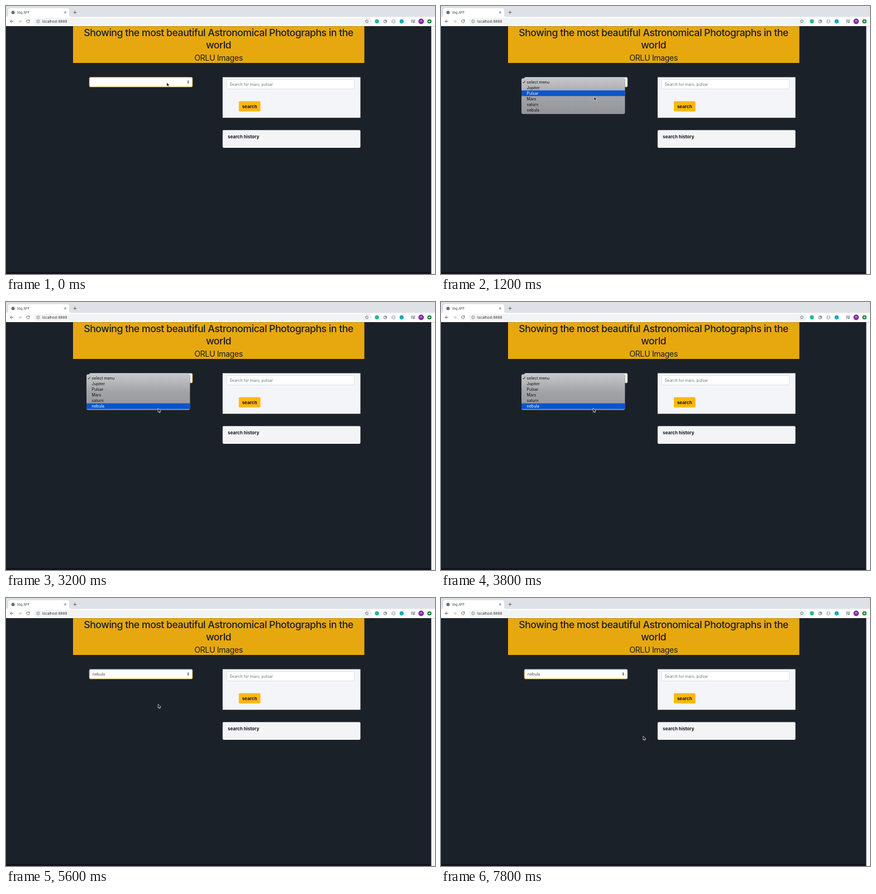
Recreate the animation shown at these times as an HTML page. Size 768 by 480 pixels, loop 8000 ms.

```html
<!DOCTYPE html>
<html lang="en">
<head>
<meta charset="utf-8">
<title>Img APP</title>
<style>
  html, body { margin: 0; width: 100%; height: 100%; overflow: hidden; background: #1b2129; }
  svg { display: block; width: 768px; height: 480px; }
  text { font: 7.05px Inter, sans-serif; fill: #111; white-space: pre; }
  .heading { font-size: 17.7px; font-weight: 500; letter-spacing: -.5px; text-anchor: middle; fill: #1c2028; }
  .subheading { font-size: 14.2px; letter-spacing: -.42px; text-anchor: middle; fill: #1c2028; }
  .bold { font-size: 8px; font-weight: 700; fill: #15191f; }
  .muted { fill: #6c757d; }
  .line { fill: none; stroke: #5f6368; stroke-width: 1; }
</style>
</head>
<body>
<svg viewBox="0 0 768 480">
  <defs>
    <linearGradient id="menuFill" x2="0" y2="1">
      <stop offset="0" stop-color="#c6c7c9"/>
      <stop offset=".5" stop-color="#a1a3a7"/>
      <stop offset="1" stop-color="#92959b"/>
    </linearGradient>
  </defs>

  <!-- Browser chrome -->
  <rect width="768" height="20" fill="#dee1e6"/>
  <path d="M0 20q4 0 4-4V8q0-4 4-4H109q4 0 4 4v8q0 4 4 4z" fill="#fff"/>
  <rect y="19.5" width="768" height="16.7" fill="#fff"/>
  <circle cx="12.7" cy="11.5" r="2.9" fill="#4d5156"/>
  <path d="M10.7 10.2l2 .6-.5 1.5M13.5 9.2l.6 1.4 1 .2M13 13.4l1.2-1" class="line" style="stroke:#ddd;stroke-width:.6"/>
  <text x="20" y="13.5" style="font-size:5.5px;fill:#3c4043">Img APP</text>
  <path d="M104.3 9.8l3.4 3.4m0-3.4l-3.4 3.4M120.6 11.5h5.8m-2.9-2.9v5.8" class="line"/>
  <path d="M13 27.5H7.5m2.6-2.6l-2.6 2.6 2.6 2.6" class="line"/>
  <path d="M22 27.5h5.5m-2.6-2.6l2.6 2.6-2.6 2.6" class="line" style="stroke:#babcbe"/>
  <path d="M41.5 25.6a2.7 2.7 0 1 0 .6 2.6M42.2 24.4v2.3h-2.3" class="line"/>
  <rect x="50" y="21.4" width="605" height="12.3" rx="6.1" fill="#f1f3f4"/>
  <circle cx="57.5" cy="27.5" r="2.6" class="line" style="stroke-width:.7"/>
  <path d="M57.5 27.2v1.7m0-3v.7" class="line" style="stroke-width:.7"/>
  <text x="65" y="29.8" style="font-size:6.3px;fill:#303338">localhost:8888</text>
  <path d="M646 24.4l.9 2 2.2.2-1.7 1.5.5 2.2-1.9-1.2-1.9 1.2.5-2.2-1.7-1.5 2.2-.2z" class="line" style="stroke-width:.7"/>
  <circle cx="664" cy="27.5" r="3.7" fill="#25b89a"/>
  <circle cx="679" cy="27.5" r="2.7" class="line"/>
  <circle cx="679.8" cy="26.8" r="1.1" fill="#5f6368"/>
  <circle cx="693.6" cy="27.5" r="3.1" class="line" style="stroke:#85888c;stroke-width:.8"/>
  <path d="M692.8 26.2l-1 1.3 1 1.3m1.6-2.6l1 1.3-1 1.3" class="line" style="stroke-width:.6"/>
  <circle cx="708.3" cy="27.5" r="3.7" fill="#1ba6bd"/>
  <path d="M725.3 25.2h4.6m-4.6 2h4.6m-4.6 2h2.7M731 29.3v-4.4h1.5" class="line" style="stroke-width:.9"/>
  <circle cx="729.9" cy="29.3" r="1.1" fill="#5f6368"/>
  <circle cx="743.2" cy="27.5" r="4.9" fill="#8428a5"/>
  <text x="743.2" y="29.4" text-anchor="middle" style="font-size:5.2px;fill:#fff">H</text>
  <circle cx="758" cy="27.5" r="3.8" fill="#188038"/>
  <path d="M756.1 27.5h3.8m-1.9-1.9v3.8" class="line" style="stroke:#fff"/>

  <!-- Page -->
  <rect y="36.2" width="768" height="443.8" fill="#1b2129"/>
  <rect y="476.5" width="762" height="3.5" fill="#11151b"/>
  <rect x="761.3" y="36.2" width="6.7" height="443.8" fill="#f8f8f9"/>
  <rect x="120" y="36.2" width="521.5" height="65.8" fill="#e7a80f"/>
  <text class="heading" x="380.5" y="54.2">Showing the most beautiful Astronomical Photographs in the</text>
  <text class="heading" x="380.5" y="76.2">world</text>
  <text class="subheading" x="380.5" y="97.9">ORLU Images</text>

  <rect x="387.8" y="127.5" width="246.7" height="72.7" fill="#f4f5f8"/>
  <rect x="395" y="131.3" width="228.4" height="17.2" rx="1.5" fill="#fff" stroke="#ced4da" stroke-width=".7"/>
  <text class="muted" x="400.2" y="142.6">Search for mars, pulsar</text>
  <rect x="416.8" y="170.6" width="38.7" height="18.2" rx="2" fill="#ffb80c"/>
  <text class="bold" x="436" y="182.8" text-anchor="middle">search</text>
  <rect x="387.8" y="222.3" width="246.7" height="31.7" rx="2" fill="#f3f4f5"/>
  <text class="bold" x="397" y="237.2">search history</text>

  <!-- Dropdown -->
  <rect x="149.2" y="127.7" width="184.6" height="17.2" rx="2" fill="#fff" stroke="#eda91e" stroke-width=".9"/>
  <path id="focusEdge" d="M149.4 129.2q0-1.5 1.8-1.5H332q1.8 0 1.8 1.5" class="line" style="stroke:#5189c4"/>
  <text id="choice" x="154.8" y="138.7" style="fill:#495057">nebula</text>
  <path d="M324.4 135.6l1.8-2.3 1.8 2.3zM324.4 136.8l1.8 2.3 1.8-2.3z" fill="#343a40"/>
  <g id="menu">
    <rect x="143.4" y="129.4" width="186.4" height="65" rx="3.2" fill="#0e1218" opacity=".5"/>
    <rect x="144" y="129.4" width="185.4" height="64.2" rx="3" fill="url(#menuFill)"/>
    <rect id="highlight" x="144" width="185.4" height="10.1" fill="#0a55cc"/>
    <path id="check" d="M146.8 136.4l1.4 1.7 2.5-4" class="line" style="stroke-width:.9"/>
  </g>

  <path id="cursor" d="M0 0V7l1.6-1.5 1 2.4 1.3-.5-1-2.4H5z" fill="#080808" stroke="#fff" stroke-width=".7"/>
</svg>
<script>
const DURATION = 8000, STEP = 200;
const MENU_OPEN = 400, MENU_CLOSE = 4200, HOVER_LAG = 150;
const ROW_TOP = 131, ROW_HEIGHT = 10.1;
const OPTIONS = ['select menu', 'Jupiter', 'Pulsar', 'Mars', 'saturn', 'nebula'];

// Cursor path: time, x, y
const PATH = [
  [0, 287.8, 137], [400, 287.8, 137], [1200, 274, 162.5], [2000, 271.6, 174.5],
  [2400, 272, 180], [2800, 272.5, 194], [3200, 272.2, 190.6], [3600, 272.3, 190.2],
  [6000, 272.3, 190.2], [6400, 330.6, 207.5], [6800, 357, 221], [7200, 366, 235],
  [7400, 365, 242], [7800, 361.8, 247.2], [8000, 361.8, 247.2]
];

const byId = id => document.getElementById(id);
const [menu, highlight, check, choice, focusEdge, cursor] =
  ['menu', 'highlight', 'check', 'choice', 'focusEdge', 'cursor'].map(byId);

const labels = OPTIONS.map((name, i) => {
  const label = document.createElementNS(menu.namespaceURI, 'text');
  label.textContent = name;
  label.setAttribute('x', 153.6);
  label.setAttribute('y', 138.5 + i * ROW_HEIGHT);
  return menu.appendChild(label);
});

function cursorAt(time) {
  const next = Math.max(1, PATH.findIndex(point => point[0] >= time));
  const [t0, x0, y0] = PATH[next - 1], [t1, x1, y1] = PATH[next];
  const k = (time - t0) / (t1 - t0);
  return [x0 + (x1 - x0) * k, y0 + (y1 - y0) * k];
}

function show(element, visible) {
  element.style.display = visible ? '' : 'none';
}

function draw(now) {
  const time = Math.floor(now % DURATION / STEP) * STEP;
  const [x, y] = cursorAt(time);
  cursor.setAttribute('transform', `translate(${x} ${y})`);

  show(menu, time >= MENU_OPEN && time < MENU_CLOSE);
  show(choice, time >= MENU_CLOSE);
  show(focusEdge, time >= MENU_OPEN);

  const hoverY = cursorAt(Math.max(0, time - HOVER_LAG))[1];
  const row = Math.min(OPTIONS.length - 1, Math.floor((hoverY - ROW_TOP) / ROW_HEIGHT));
  highlight.setAttribute('y', ROW_TOP + row * ROW_HEIGHT);
  labels.forEach((label, i) => label.style.fill = i === row ? '#fff' : '#111');
  check.style.stroke = row === 0 ? '#fff' : '#111';
  requestAnimationFrame(draw);
}
requestAnimationFrame(draw);
</script>
</body>
</html>
```
